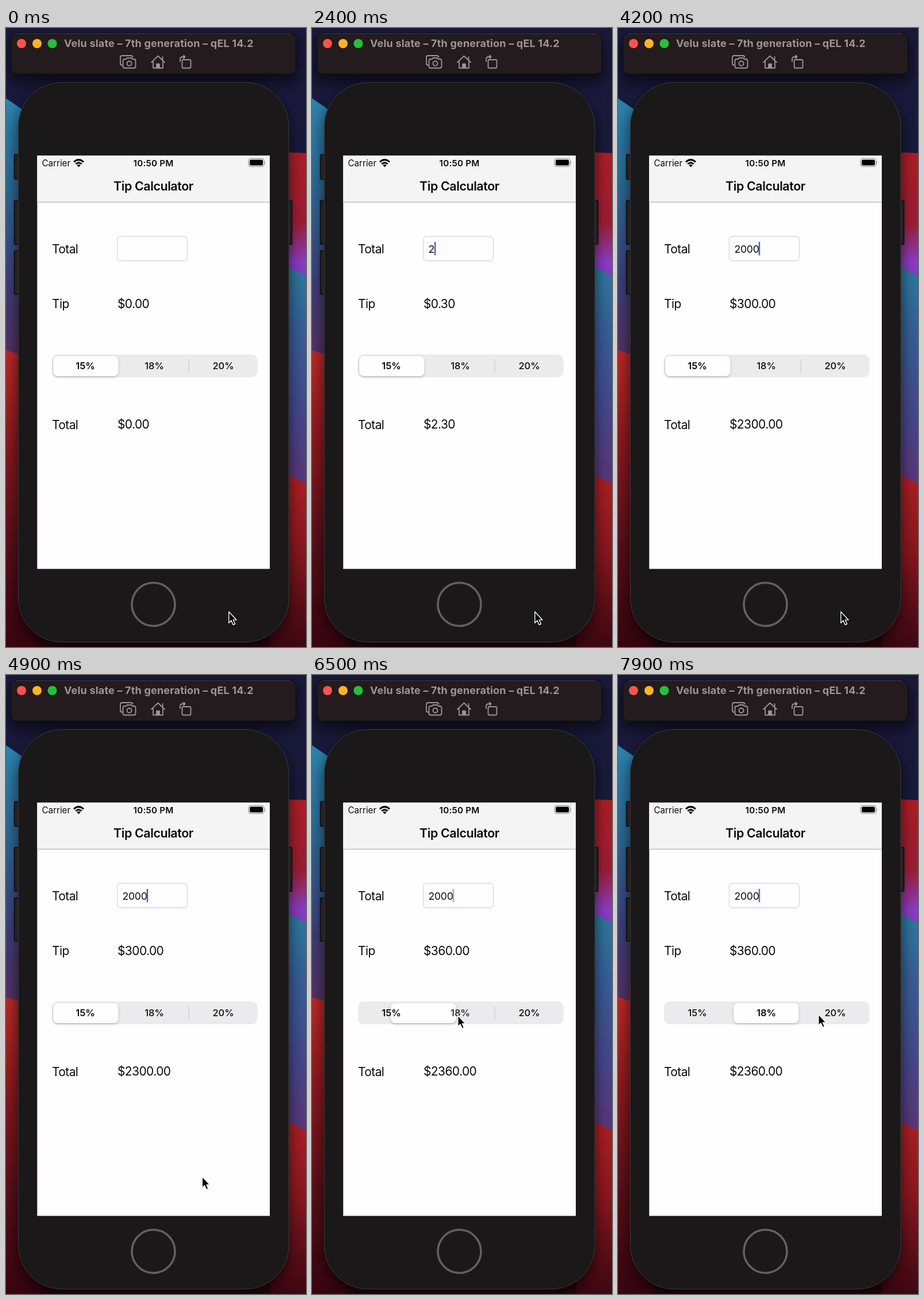
These frames come from a looping animation (522x1074 px, 8 s). An HTML page:

```html
<!DOCTYPE html>
<html lang="en">
<head>
<meta charset="utf-8">
<title>Tip Calculator</title>
<style>
  html, body { margin: 0; width: 100%; height: 100%; overflow: hidden; background: #17172f; }
  svg { display: block; width: 100vw; height: 100vh; }
  text { font-family: Inter, Roboto, sans-serif; fill: #0b0a0c; white-space: pre; }
  .mid { text-anchor: middle; }
  .body { font-size: 21px; letter-spacing: -.6px; }
  .status { font-size: 15.2px; }
  .bold { font-weight: 600; }
  .segment { font-size: 16.5px; font-weight: 500; text-anchor: middle; }
  .icon { fill: none; stroke: #9b9698; stroke-width: 1.8; stroke-linejoin: round; stroke-linecap: round; }
  .button { fill: #232122; stroke: #0c0b0d; stroke-width: 1.5; }
</style>
</head>
<body>
<svg viewBox="0 0 522 1074" preserveAspectRatio="none">
  <defs>
    <linearGradient id="leftBlue" x2="0" y2="1">
      <stop stop-color="#2b83ae"/><stop offset=".35" stop-color="#2c6794"/>
      <stop offset=".7" stop-color="#3d3d78"/><stop offset="1" stop-color="#59305f"/>
    </linearGradient>
    <linearGradient id="leftRed" x2="0" y2="1">
      <stop stop-color="#bc2925"/><stop offset=".3" stop-color="#8d191e"/>
      <stop offset=".65" stop-color="#5a0f19"/><stop offset="1" stop-color="#37050f"/>
    </linearGradient>
    <linearGradient id="rightRed" x2="0" y2="1">
      <stop stop-color="#ad1d25"/><stop offset=".55" stop-color="#9b1d33"/>
      <stop offset=".85" stop-color="#8a3cc4"/><stop offset="1" stop-color="#7d3bb8"/>
    </linearGradient>
    <linearGradient id="rightBlue" x2="0" y2="1">
      <stop stop-color="#2b7d9f"/><stop offset=".3" stop-color="#355f96"/>
      <stop offset=".7" stop-color="#46458a"/><stop offset="1" stop-color="#5b3577"/>
    </linearGradient>
    <linearGradient id="rightLow" x2="0" y2="1">
      <stop stop-color="#b02024"/><stop offset=".45" stop-color="#8a171f"/>
      <stop offset="1" stop-color="#3c0712"/>
    </linearGradient>
    <filter id="blur" x="-20%" y="-20%" width="140%" height="140%"><feGaussianBlur stdDeviation="12"/></filter>
    <filter id="soft" x="-20%" y="-40%" width="140%" height="180%">
      <feDropShadow dx="0" dy="2" stdDeviation="2.2" flood-opacity=".2"/>
    </filter>
  </defs>

  <!-- wallpaper -->
  <path fill="#19193b" d="M0 0H522V1074H0z"/>
  <path fill="url(#leftBlue)" d="M0 122L60 163V585L0 566z"/>
  <path fill="url(#leftRed)" d="M0 559L60 578V1074H0z"/>
  <path fill="url(#rightRed)" d="M460 215L522 217V440L460 410z"/>
  <path fill="url(#rightBlue)" d="M460 400L522 430V800H460z"/>
  <path fill="url(#rightLow)" d="M460 762L522 790V1074H460z"/>
  <path fill="#2a0610" d="M60 1040H460V1074H60z"/>
  <g filter="url(#blur)" opacity=".6">
    <rect x="20" y="104" width="473" height="974" rx="78"/>
    <rect x="8" y="18" width="498" height="76" rx="12"/>
  </g>

  <!-- simulator bar -->
  <rect x="8.5" y="9" width="496" height="71" rx="10" fill="#231b1e" stroke="#0d0a0d"/>
  <path d="M18 9.7H495" stroke="#453e41"/>
  <circle cx="27" cy="27" r="8" fill="#ff524e"/>
  <circle cx="54" cy="27" r="8" fill="#ffb326"/>
  <circle cx="80.5" cy="27" r="8" fill="#26c03a"/>
  <text x="101" y="32.5" font-size="18" font-weight="700" letter-spacing="0.2" style="fill:#9b9698">Velu slate – 7th generation – qEL 14.2</text>
  <g class="icon">
    <path d="M202 64.5Q199 64.5 199 61.5V51Q199 48 202 48H217.5Q220 48 220.5 50.5"/>
    <path d="M206.5 54H209L210.5 52H218L219.5 54H222.5Q225.5 54 225.5 57V66.5Q225.5 69.5 222.5 69.5H206.5Q203.5 69.5 203.5 66.5V57Q203.5 54 206.5 54z"/>
    <circle cx="214.5" cy="61.5" r="4"/>
    <path d="M253 59.5L264.5 48.500L276 59.5M256 58V69.5H273V58M272.5 55V50"/>
    <path fill="#9b9698" d="M262 62.5H267V69H262z"/>
    <rect x="306.5" y="55" width="15" height="14.5" rx="2"/>
    <path d="M303 58V55Q303 50 307.5 50H311M309 47.5L311.5 50L309 52.5"/>
  </g>

  <!-- device -->
  <rect class="button" x="14.5" y="219.5" width="14" height="43" rx="2"/>
  <rect class="button" x="14.5" y="299" width="14" height="76.5" rx="2"/>
  <rect class="button" x="14.5" y="386.5" width="14" height="75.5" rx="2"/>
  <rect class="button" x="483" y="299" width="14.5" height="76.5" rx="2"/>
  <rect x="21.5" y="94.5" width="470.5" height="971" rx="76" fill="#1a1819" stroke="#3b393a"/>
  <circle cx="256.5" cy="1000" r="37.5" fill="none" stroke="#626062" stroke-width="3.6"/>

  <!-- screen -->
  <path fill="#fefdff" d="M54.3 221.4H459V938.4H54.3z"/>
  <path fill="#f5f4f5" d="M54.3 221.4H459V302H54.3z"/>
  <path stroke="#c3c2c4" stroke-width="1.4" d="M54.3 302.3H459"/>
  <text class="status" x="62.5" y="239.5">Carrier</text>
  <g fill="none" stroke="#050505" stroke-width="3">
    <path d="M118 232.5Q126.5 224.7 135 232.5M121.3 236Q126.5 231.4 131.7 236"/>
    <path fill="#050505" stroke="none" d="M126.5 241.5L123.3 238Q126.5 235.4 129.7 238z"/>
  </g>
  <text class="status bold mid" x="256.5" y="239.5" letter-spacing=".2">10:50 PM</text>
  <rect x="422" y="226.5" width="27" height="14" rx="4" fill="none" stroke="#8b8a8c" stroke-width="1.2"/>
  <rect x="424" y="228.5" width="23" height="10" rx="2.3" fill="#000"/>
  <path fill="#8b8a8c" d="M450.3 231Q452.3 233.5 450.3 236z"/>
  <text class="bold mid" x="256.5" y="282" font-size="21.4" letter-spacing="-.4">Tip Calculator</text>

  <text class="body" x="80" y="391">Total</text>
  <rect x="193.5" y="361.5" width="122" height="42.5" rx="6" fill="#fefdff" stroke="#d9d8de" stroke-width="1.3"/>
  <text id="amount" x="202.5" y="389.5" font-size="17.7" letter-spacing="-.3"></text>
  <rect id="caret" y="371" width="2.5" height="23.5" rx="1" fill="#4760c6"/>

  <text class="body" x="80" y="486">Tip</text>
  <text class="body" id="tip" x="194" y="486"></text>

  <rect x="80" y="566.5" width="357.5" height="39.5" rx="10" fill="#ebeaec"/>
  <path id="divider" stroke="#d0cfd2" stroke-width="1.3" d="M318 575V598"/>
  <rect id="thumb" y="569" width="113.5" height="35" rx="8" fill="#fefdff" stroke="#000" stroke-opacity=".05" filter="url(#soft)"/>
  <text class="segment" id="seg15" x="138" y="592">15%</text>
  <text class="segment" id="seg18" x="258" y="592">18%</text>
  <text class="segment" x="378" y="592">20%</text>

  <text class="body" x="80" y="695.5">Total</text>
  <text class="body" id="total" x="194" y="694.5"></text>

  <path id="pointer" d="M.8 1.8V21.2L5 17.1L8.2 24.4L11.5 23L8.4 15.9H14z" stroke="#fff" stroke-width="1.4" stroke-linejoin="round"/>
</svg>
<script>
const LOOP = 8000, STEP = 100, BLINK = 0.85, TAP = 6.31;
const keys = [[2.3, "2"], [2.7, "20"], [3.6, "200"], [3.94, "2000"]];
const moves = [ // start, end, x, y
  [0, 0, 387, 1011], [4.5, 5.5, 255, 606], [5.8, 6.2, 253, 589], [6.9, 7.7, 348, 587]
];

const el = id => document.getElementById(id);
const clamp = v => Math.min(1, Math.max(0, v));
const ease = (t, start, end) => {
  const u = end > start ? clamp((t - start) / (end - start)) : 1;
  return u * u * (3 - 2 * u);
};
const money = v => "$" + v.toFixed(2);

function caretAlpha(t, keyTime) {
  if (t < keyTime) return 0;
  const p = (t - keyTime) % BLINK;
  return clamp(Math.min(0.5 + p * 5, (0.65 - p) * 10));
}

function pointerAt(t) {
  let x = 0, y = 0;
  for (const [start, end, toX, toY] of moves) {
    if (t < start) break;
    const k = ease(t, start, end);
    x += (toX - x) * k;
    y += (toY - y) * k;
  }
  return [x, y];
}

function draw(t) {
  const [keyTime, typed] = keys.filter(k => k[0] <= t).pop() || [0.2, ""];
  const value = Number(typed);
  const tip = value * (t < TAP ? 0.15 : 0.18);
  el("amount").textContent = typed;
  el("tip").textContent = money(tip);
  el("total").textContent = money(value + tip);

  el("caret").setAttribute("x", 202.3 + 10.6 * typed.length);
  el("caret").setAttribute("opacity", caretAlpha(t, keyTime));

  const slide = ease(t, TAP, TAP + 0.4);
  el("thumb").setAttribute("x", 82 + 119 * slide);
  el("divider").setAttribute("opacity", 1 - ease(t, TAP + 0.2, TAP + 0.45));
  const pressed = t > TAP - 0.1 && t < TAP + 0.35;
  el("seg18").setAttribute("opacity", pressed ? 0.8 : 1);
  el("seg15").style.fontWeight = slide < 0.5 ? 600 : 500;
  el("seg18").style.fontWeight = slide > 0.4 ? 600 : 500;

  el("pointer").setAttribute("transform", `translate(${pointerAt(t)})`);
}

function tick() {
  draw(Math.floor(performance.now() % LOOP / STEP) * STEP / 1000);
  requestAnimationFrame(tick);
}
tick();
</script>
</body>
</html>
```
